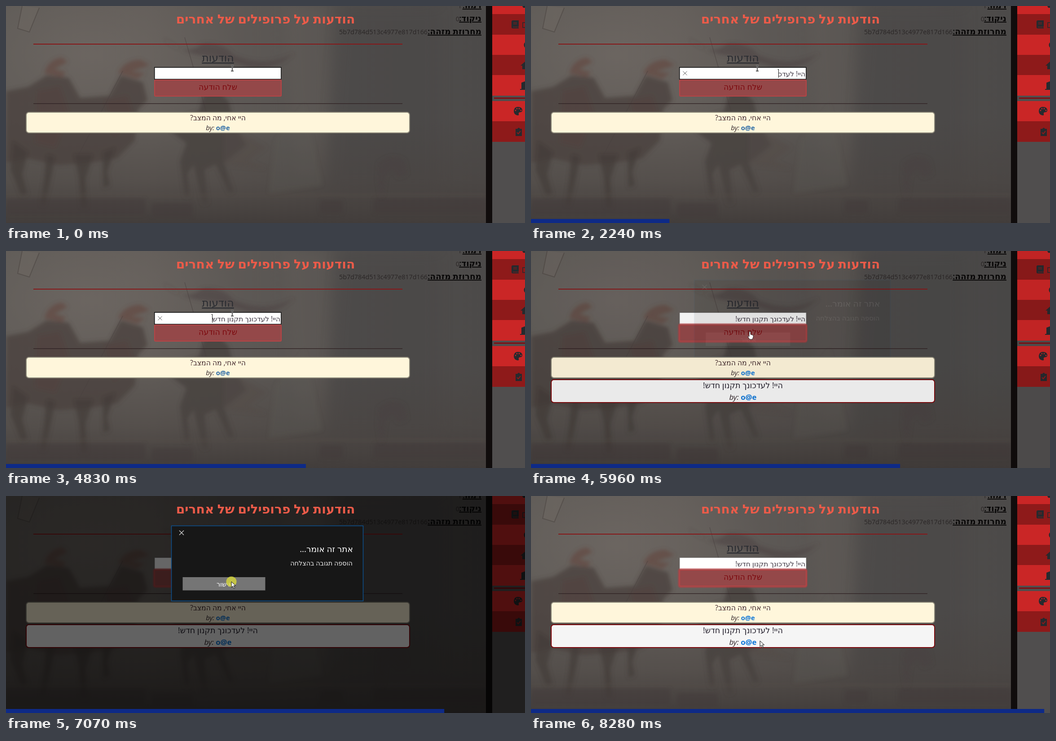
An HTML page that plays this animation: 1156 by 484 pixels, repeating every 8380 ms.

```html
<!DOCTYPE html>
<html lang="he">
<head>
<meta charset="utf-8">
<style>
html, body { margin: 0; width: 100%; height: 100%; overflow: hidden; background: #565150; }
svg { display: block; width: 1156px; height: 484px; font-family: "Open Sans", "Noto Sans", "DejaVu Sans", sans-serif; }
text { white-space: pre; }
.he { direction: rtl; }
.mid { text-anchor: middle; }
.line { text-decoration: underline 1px; }
.by { font-style: italic; fill: #33272b; }
.by .user { font-style: normal; font-weight: 700; fill: var(--link, #2b6ba6); }
.anim { animation: 8380ms linear infinite; }
#bar { animation-name: grow; animation-timing-function: steps(90); animation-delay: -19ms; }
#shade { animation-name: fade; }
#dialog { animation-name: fade, settle; animation-duration: 8380ms; transform-origin: 582px 150px; }
#cursor { animation-name: travel; }
@keyframes grow { from { transform: scaleX(0); } to { transform: scaleX(1); } }
@keyframes fade {
  0%, 70.8% { opacity: 0; }
  73.4% { opacity: .6; }
  75.8%, 85.3% { opacity: 1; }
  87.9%, 100% { opacity: 0; }
}
@keyframes settle {
  0%, 70.8% { transform: scale(1.025); }
  73.4% { transform: scale(1.01); }
  75.8%, 85.3% { transform: scale(1); }
  87.9%, 100% { transform: scale(1.025); }
}
@keyframes travel {
  0%, 59.7% { transform: translate(504px, 139px); animation-timing-function: ease-in-out; }
  63%, 77.5% { transform: translate(488px, 180px); animation-timing-function: ease-in-out; }
  82.5%, 89.2% { transform: translate(502px, 191px); animation-timing-function: ease-in-out; }
  97%, 100% { transform: translate(510px, 323px); }
}
</style>
</head>
<body>
<svg viewBox="0 0 1156 484">
  <defs>
    <linearGradient id="haze">
      <stop offset="0" stop-color="#5f5b57"/><stop offset=".3" stop-color="#625d59"/>
      <stop offset=".58" stop-color="#5a5653"/><stop offset=".72" stop-color="#514e4c"/>
      <stop offset="1" stop-color="#4c4a49"/>
    </linearGradient>
    <linearGradient id="ground" x2="0" y2="1">
      <stop offset="0" stop-color="#48423f" stop-opacity="0"/><stop offset=".6" stop-color="#48423f" stop-opacity=".5"/>
      <stop offset="1" stop-color="#423d3b"/>
    </linearGradient>
    <radialGradient id="glow">
      <stop offset="0" stop-color="#716a65" stop-opacity=".65"/><stop offset="1" stop-color="#716a65" stop-opacity="0"/>
    </radialGradient>
    <filter id="soft" x="-20%" y="-20%" width="140%" height="140%"><feGaussianBlur stdDeviation="4"/></filter>
    <filter id="softer" x="-20%" y="-20%" width="140%" height="140%"><feGaussianBlur stdDeviation="14"/></filter>
    <clipPath id="scene"><path d="M0 0H1069V484H0Z"/></clipPath>
  </defs>

  <g clip-path="url(#scene)">
    <rect width="1069" height="484" fill="url(#haze)"/>
    <ellipse cx="190" cy="110" rx="330" ry="190" fill="url(#glow)"/>
    <path d="M620 0h100l-5 390h-70z" fill="#66605c" opacity=".35" filter="url(#softer)"/>
    <path d="M745 0h220v410h-250z" fill="#4a4746" opacity=".5" filter="url(#softer)"/>
    <rect y="250" width="1069" height="234" fill="url(#ground)"/>
    <g filter="url(#soft)">
      <path d="M0 190l50-10 40-25 50 5 25 45 65-5 25-45 50 15 10 40-20 20-8 70-40 40-60 10-70 5-70-15-47 10z" fill="#4a423f" opacity=".75"/>
      <path d="M15 300l35 25-14 50 12 45-14 4-24-60zM150 330h45l-18 55 4 65h-14l-5-70zM215 325l30-10-20 55 6 30-14 5zM90 330l20 5-12 60-12 50h-9l8-60z" fill="#443c39" opacity=".75"/>
      <path d="M70 190l50-10 20 60-30 75-45-10zM220 210l50-10 15 50-45 40z" fill="#533f3c" opacity=".6"/>
      <path d="M85 150q10-32 40-35l12 10-30 16 26 6-8 12zM250 150q14-30 50-30l20 12-42 14 32 4-18 12z" fill="#65453f" opacity=".6"/>
      <path d="M368 280l27-35 35-10 10-38 30-12 26 28 14 55 25 42-35 28-15 10 22 65-10 5-30-65-25 12 8 75-12 2-20-88-14 20 6 50-12 2-10-80 14-40z" fill="#49423f" opacity=".8"/>
      <path d="M485 260l95 55-40 30 40 18-95-8z" fill="#524a46" opacity=".5"/>
      <path d="M830 350q30-25 58-5l6 30-20 8-14-18-14 14-6 45-6 4-6-40z" fill="#4a4441" opacity=".65"/>
      <path d="M352 72q45 45 85 12 45-5 70 25 70 30 135-4-40 38-95 34-55-20-105-28-50-5-90-39z" fill="#504746" opacity=".65"/>
      <path d="M600 300l65-80 40 180-120 18z" fill="#625b56" opacity=".25"/>
    </g>
    <path d="M398 70l52 180M160 335l100-190" stroke="#4a4240" stroke-width="1.5" opacity=".55"/>
    <path d="M36 0l38 4-22 54-26-8z" fill="#6f6862" opacity=".5"/>
    <path d="M36 0l-10 50 26 8 22-54" fill="none" stroke="#4d4743" stroke-width="2" opacity=".6"/>
    <path d="M0 418h1069v8H0z" fill="#5b524d" opacity=".3" filter="url(#soft)"/>
    <path d="M0 430h310v35H0zM325 440h90v30h-90zM700 434h50v28h-50zM820 430h249v32H820z" fill="#423b3a" opacity=".5" filter="url(#soft)"/>
  </g>
  <rect x="1069" width="14" height="484" fill="#100c0c"/>
  <rect x="1083" width="73" height="484" fill="#504e4e"/>

  <g id="side"></g>
  <rect x="1087" y="204" width="69" height="3" fill="#7d1014"/>
  <g fill="#262a2e">
    <path d="M1129 32h13v14h-1v2h1v2h-13q-3 0-3-3v-12q0-3 3-3z"/>
    <path d="M1130 37h8M1130 40h8M1129 47h11" stroke="#8e1a1a"/>
    <path d="M1156 37h-5v11h5" fill="none" stroke="#262a2e" stroke-width="1.5"/>
    <circle cx="1162" cy="87" r="8.5"/>
    <path d="M1146 133l10-9v17h-6v-8z"/>
    <path d="M1145 185h3v-14l8-3v19h-11z"/>
    <path d="M1150 0h6v4h-4z"/>
    <path d="M1140 225q10 0 10 8 0 4-6 4-3 1-2 4 1 3-2 3-9-1-9-10 1-9 9-9z"/>
    <path d="M1135 274h4q3-5 6 0h4v16h-14z"/>
  </g>
  <g fill="#ca2626"><circle cx="1135" cy="233" r="1.4"/><circle cx="1138" cy="229" r="1.4"/><circle cx="1143" cy="229" r="1.4"/><circle cx="1147" cy="233" r="1.4"/></g>
  <path d="M1138 282l3 3 5-6" fill="none" stroke="#8e1a1a" stroke-width="2"/>

  <g class="he" font-size="18.5" font-weight="600" fill="#080707">
    <text class="line" x="1059" y="5">רמה:</text>
    <text class="line" x="1059" y="34">ניקוד:</text>
    <text class="line" x="1059" y="63">מחרוזת מזהה:</text>
  </g>
  <g font-size="14.3" fill="#2a2626" text-anchor="end">
    <text x="1015" y="5">1</text><text x="1010" y="34">0</text>
    <text x="939" y="63">5b7d784d513c4977e817d166</text>
  </g>
  <rect x="61" y="84" width="822" height="2" fill="#871719"/>
  <rect x="61" y="217" width="822" height="1.3" fill="#2f2123"/>
  <text class="he mid line" x="472" y="124" font-size="23.6" fill="#2a2c31">הודעות</text>

  <rect x="331" y="137.5" width="282" height="26" fill="#fff" stroke="#777" stroke-width=".8"/>
  <rect id="focus" x="330.7" y="136.7" width="282" height="26.600" fill="none" stroke="#111" stroke-width="1.4"/>
  <text id="typed" class="he" x="611" y="157" font-size="15.4" fill="#3b3440"></text>
  <path id="caret" d="M.5 141v19M.5 141.500h-2" stroke="#111" fill="none"/>
  <path id="clear" d="M338.500 145.500l9 9m0-9l-9 9" stroke="#444" stroke-width=".9"/>
  <rect id="halo" x="329" y="163" width="285" height="40" rx="4" fill="none" stroke="#c03c40" stroke-width="4" opacity=".5"/>
  <rect x="331" y="165" width="282" height="36" rx="2" fill="#944849" stroke="#b84345" stroke-width="2"/>
  <text class="he mid" x="472" y="187" font-size="17.4" fill="#7c080d">שלח הודעה</text>

  <rect x="45" y="237" width="854" height="46" rx="6" fill="#fff6db" stroke="#8b8778" stroke-width="2"/>
  <text class="he mid" x="472" y="255" font-size="15.6" fill="#42292d">היי אחי, מה המצב?</text>
  <text class="by mid" x="472" y="277" font-size="14.7">by: <tspan class="user">o@e</tspan></text>
  <g id="reply">
    <rect x="45" y="287" width="854" height="51" rx="6" fill="#f5f5f5" stroke="#7c080c" stroke-width="2"/>
    <text class="he mid" x="472" y="306" font-size="17.6" fill="#211d2a">היי! לעדכונך תקנון חדש!</text>
    <text class="by mid" x="472" y="332" font-size="16.8">by: <tspan class="user">o@e</tspan></text>
  </g>

  <rect id="shade" class="anim" width="1156" height="484" fill="#000" fill-opacity=".6"/>
  <text class="he mid" x="578" y="39" font-size="28.2" font-weight="700" fill="#ec5b49">הודעות על פרופילים של אחרים</text>

  <g id="dialog" class="anim">
    <rect x="368.5" y="66.5" width="427" height="167.5" fill="#171717" stroke="#0c5291" stroke-width="1.5"/>
    <path d="M386 77l10 10m0-10l-10 10" stroke="#ddd" stroke-width="1.2"/>
    <text class="he" x="773" y="125" font-size="18.6" fill="#fff">אתר זה אומר...</text>
    <text class="he" x="772" y="155" font-size="14.4" fill="#eee">הוספה תגובה בהצלחה</text>
    <rect x="393.5" y="181" width="184" height="29.5" fill="#757575"/>
    <text class="he mid" x="486.5" y="202" font-size="14.4" fill="#fff">אישור</text>
  </g>

  <rect id="bar" class="anim" y="475" width="1156" height="9" fill="#0e2a87"/>

  <g id="cursor" class="anim">
    <circle id="click" r="11.5" fill="#d6d53c" opacity=".82"/>
    <g id="beam" fill="none">
      <path d="M-3-6h6M0-6v12M-3 6h6" stroke="#aaa" stroke-width="2.6"/>
      <path d="M-3-6h6M0-6v12M-3 6h6" stroke="#222"/>
    </g>
    <path id="hand" d="M-1 0q2-1 2 1v5l6 2v4l-2 5h-6l-4-6q1-2 3 0v-10z" fill="#fff" stroke="#111" stroke-width=".8"/>
    <path id="arrow" d="M0 0v13l3-3 2.500 5.500 2.200-1-2.400-5.500h4.300z" fill="#eee" stroke="#111"/>
  </g>
</svg>
<script>
const LOOP = 8380;
const MESSAGE = "היי! לעדכונך תקנון חדש!";
const KEY_TIMES = [250, 400, 560, 720, 830, 1000, 1300, 1550, 2100, 2720, 2880, 3000,
  3200, 3500, 3600, 3720, 3820, 3950, 4050, 4180, 4300, 4500, 4920];
const BLUR = 5380, SENT = 5930;
const spans = {
  focus: [[0, BLUR]],
  clear: [[KEY_TIMES[0], BLUR]],
  halo: [[BLUR, LOOP]],
  reply: [[SENT, LOOP]],
  beam: [[0, 5150]],
  hand: [[5150, 6300]],
  arrow: [[6300, LOOP]],
  click: [[5390, 5560], [6990, 7180]]
};
const el = id => document.getElementById(id);
const show = (id, on) => { el(id).style.visibility = on ? "visible" : "hidden"; };

// Menu rows: top and height
const rows = [[0, 18], [18, 46], [64, 45], [109, 45], [154, 46], [212, 45], [257, 46]];
const darkRows = [1, 3, 6];
el("side").innerHTML = rows.map(([y, h], i) =>
  `<rect x="1083" y="${y}" width="73" height="${h}" fill="${darkRows.includes(i) ? "#8e1a1a" : "#ca2626"}"/>`).join("");

let shown = -1;
function draw(t) {
  for (const id in spans) show(id, spans[id].some(([a, b]) => t >= a && t < b));
  const count = KEY_TIMES.filter(k => k <= t).length;
  if (count !== shown) {
    shown = count;
    const typed = el("typed");
    typed.textContent = MESSAGE.slice(0, count);
    const x = 611 - (count ? typed.getComputedTextLength() : 0);
    el("caret").setAttribute("transform", `translate(${Math.round(x)})`);
  }
  const idle = t - KEY_TIMES[count - 1];
  show("caret", count > 0 && t < BLUR && idle % 1060 < 530);
  document.documentElement.style.setProperty("--link", t < SENT ? "#2b6ba6" : "#0d76d8");
}

let start;
function tick(now) {
  start ??= now;
  draw((now - start) % LOOP);
  requestAnimationFrame(tick);
}
draw(0);
requestAnimationFrame(tick);
</script>
</body>
</html>
```
